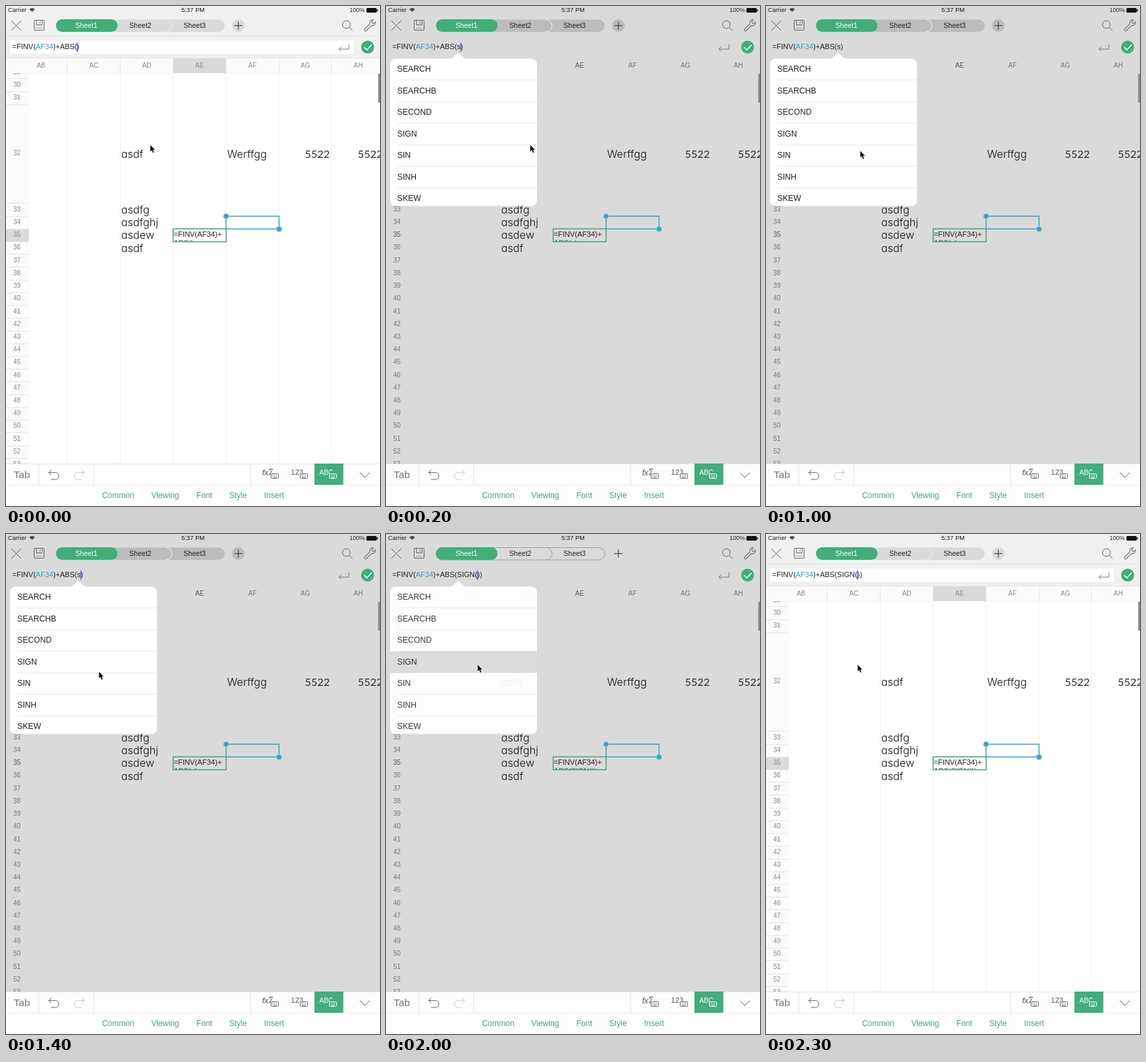
An HTML page with a canvas that plays this animation: 565x754 px, repeating every 2.4 s.

```html
<!DOCTYPE html>
<html lang="en">
<head>
<meta charset="utf-8">
<title>Spreadsheet formula completion</title>
<style>
  html, body { margin: 0; width: 100%; height: 100%; overflow: hidden; background: #fff; }
  #stage { position: relative; width: 565px; height: 754px; overflow: hidden; }
  canvas { position: absolute; left: 0; top: 0; }
  .cell {
    position: absolute; white-space: pre; color: #151515; line-height: 20px;
    font: 300 16.2px/20px Inter, sans-serif; font-feature-settings: "cv11" 1;
  }
  .num { font-family: Lato, sans-serif; font-weight: 400; color: #2a2a2a; }
</style>
</head>
<body>
<div id="stage"><canvas id="base" width="565" height="754"></canvas></div>
<script>
const W = 565, H = 754, LOOP = 2400, STEP = 100;
const stage = document.getElementById('stage');
const base = document.getElementById('base').getContext('2d');

const GREEN = '#43ad7b', BLUE = '#3c9fbd';
const COLS = [92, 172, 252, 332, 412, 491];
const ITEMS = ['SEARCH', 'SEARCHB', 'SECOND', 'SIGN', 'SIN', 'SINH', 'SKEW'];
const PITCH = 19.22;

const LOOKS = {
  open: { bar: '#f0f0f0', field: '#fff', head: '#fbfbfb', sheet: '#fff', sel: '#dadada',
          line: '#f1f1f1', rule: '#e4e4e4', pill: '#dadada', label: '#8a8a8a' },
  fade: { bar: '#dedede', field: '#f6f6f6', head: '#ededed', sheet: '#f2f2f2', sel: '#d8d8d8',
          line: '#e8e8e8', rule: '#e0e0e0', pill: null, label: '#858585', rows: true },
  dim:  { bar: '#dadada', field: null, head: null, sheet: '#dadada', sel: null,
          line: null, rule: null, pill: '#bcbcbc', label: '#777' }
};

// cell texts sit between the two canvases
function addCell(text, x, y, num) {
  const s = document.createElement('span');
  s.className = num ? 'cell num' : 'cell';
  s.textContent = text;
  s.style.left = x + 'px';
  s.style.top = (y - 9.5) + 'px';
  stage.appendChild(s);
}
addCell('asdf', 174, 222);
addCell('Werffgg', 334, 222);
addCell('5522', 451.5, 222, true);
addCell('5522', 531.5, 222, true);
['asdfg', 'asdfghj', 'asdew', 'asdf'].forEach((t, i) => addCell(t, 174, 306.5 + i * PITCH));

const topCanvas = document.createElement('canvas');
topCanvas.width = W;
topCanvas.height = H;
stage.appendChild(topCanvas);
const over = topCanvas.getContext('2d');

function box(c, x, y, w, h, fill) {
  if (!fill) return;
  c.fillStyle = fill;
  c.fillRect(x, y, w, h);
}
function pill(c, x, y, w, h, r, fill, stroke) {
  c.beginPath();
  c.roundRect(x, y, w, h, r);
  if (fill) { c.fillStyle = fill; c.fill(); }
  if (stroke) { c.strokeStyle = stroke; c.lineWidth = 1; c.stroke(); }
}
function line(c, pts, color, width = 1) {
  if (!color) return;
  c.beginPath();
  for (let i = 0; i < pts.length; i += 2) c.lineTo(pts[i], pts[i + 1]);
  c.strokeStyle = color;
  c.lineWidth = width;
  c.stroke();
}
function disc(c, x, y, r, fill, stroke, width = 1) {
  c.beginPath();
  c.arc(x, y, r, 0, Math.PI * 2);
  if (fill) { c.fillStyle = fill; c.fill(); }
  if (stroke) { c.strokeStyle = stroke; c.lineWidth = width; c.stroke(); }
}
function text(c, s, x, y, size, color, align = 'left', weight = '') {
  c.font = `${weight} ${size}px "Liberation Sans", Arial, sans-serif`;
  c.textAlign = align;
  c.textBaseline = 'middle';
  c.fillStyle = color;
  c.fillText(s, x, y);
  return x + c.measureText(s).width;
}

function drawStatus(c) {
  text(c, 'Carrier', 3, 6.5, 9.2, '#222');
  for (const r of [1, 3, 5]) {
    c.beginPath();
    c.arc(39.5, 9, r, -Math.PI * .77, -Math.PI * .23);
    c.strokeStyle = '#222';
    c.lineWidth = 1.3;
    c.stroke();
  }
  text(c, '5:37 PM', 282.5, 6.5, 9.4, '#111', 'center');
  text(c, '100%', 519, 6.5, 9, '#222');
  pill(c, 544.5, 3, 15.5, 7, 1.5, '#111');
  box(c, 560.5, 5, 1.5, 3, '#111');
}

function drawTabs(c, k, outline) {
  const ink = '#666';
  line(c, [8, 22, 23, 37], ink);
  line(c, [23, 22, 8, 37], ink);

  pill(c, 42.5, 21.5, 15, 15, 1.5, null, ink);
  line(c, [46, 22, 46, 28.5, 54.5, 28.5, 54.5, 22], ink);
  line(c, [51.5, 23.5, 51.5, 26.5], ink);
  line(c, [45, 33.5, 55, 33.5], '#999');

  const fill = outline ? null : k.pill;
  pill(c, 75.5, 20.5, 255, 18.5, 9.25, fill, outline ? '#a2a2a2' : null);
  if (k.pill) {
    c.beginPath();
    c.arc(241.5, 29.75, 9.3, -Math.PI / 2, Math.PI / 2);
    c.strokeStyle = outline ? '#a2a2a2' : '#f0f0f0';
    c.lineWidth = 1;
    c.stroke();
  }
  pill(c, 75.5, 20, 93, 19, 9.5, GREEN);
  text(c, 'Sheet1', 121.5, 30, 10.5, '#fff', 'center');
  text(c, 'Sheet2', 203, 30, 10.5, '#222', 'center');
  text(c, 'Sheet3', 285, 30, 10.5, '#222', 'center');

  if (fill) disc(c, 351, 29.5, 9.7, fill);
  line(c, [345, 29.5, 357, 29.5], '#444', 1.2);
  line(c, [351, 23.5, 351, 35.5], '#444', 1.2);

  disc(c, 514.2, 28, 5.8, null, ink);
  line(c, [518.5, 32.3, 523.5, 37.3], ink);

  // wrench
  c.save();
  c.translate(549.5, 29.5);
  c.rotate(Math.PI / 4);
  c.beginPath();
  c.moveTo(-1.8, -2);
  c.lineTo(-1.8, 9);
  c.arc(0, 9, 1.8, Math.PI, 0, true);
  c.lineTo(1.8, -2);
  c.bezierCurveTo(5.5, -4, 5, -8.5, 2, -10);
  c.lineTo(2, -5.8);
  c.lineTo(-2, -5.8);
  c.lineTo(-2, -10);
  c.bezierCurveTo(-5, -8.5, -5.5, -4, -1.8, -2);
  c.strokeStyle = ink;
  c.lineWidth = 1;
  c.stroke();
  c.restore();
}

function drawFormula(c, k, arg, caret) {
  if (k.field) pill(c, 6, 52, 520, 20, 2.5, k.field);
  const size = 11.07, y = 62, ink = '#222';
  let x = text(c, '=FINV(', 9.5, y, size, ink);
  x = text(c, 'AF34', x, y, size, '#3c9bc0');
  x = text(c, ')+ABS(', x, y, size, ink);
  const inner = arg.endsWith(')') ? arg.slice(0, -1) : arg;
  x = text(c, inner, x, y, size, ink);
  text(c, arg.slice(inner.length) + ')', x, y, size, ink);
  if (caret) box(c, x - .4, 55, 1.5, 14, '#4472d6');

  line(c, [518, 58, 518, 65, 503, 65], '#777');
  line(c, [506.5, 61.5, 503, 65, 506.5, 68.5], '#777');
  disc(c, 546.3, 62, 9.8, GREEN);
  line(c, [541, 62, 545.2, 66.2, 552.3, 58.5], '#fff', 1.4);
}

function drawGrid(c, k, arg) {
  box(c, 0, 78, W, 612, k.sheet);
  box(c, 0, 78, W, 23.5, k.head);
  box(c, 0, 101, 34.5, 589, k.head);
  box(c, 252, 78.5, 80.5, 23, k.sel);
  box(c, 0, 336, 34.5, 19.2, k.sel);
  for (const x of COLS) {
    line(c, [x + .5, 79, x + .5, 101], k.rule);
    line(c, [x + .5, 102, x + .5, 690], k.line);
  }
  line(c, [0, 78.5, W, 78.5], k.rule);
  line(c, [0, 45.5, W, 45.5], k.rule);
  line(c, [0, 101.5, W, 101.5], k.line);

  ['AB', 'AC', 'AD', 'AE', 'AF', 'AG', 'AH'].forEach((s, i) =>
    text(c, s, 52.8 + i * 79.9, 89.8, 10, s === 'AE' && !k.sel ? '#555' : k.label, 'center'));

  c.save();
  c.beginPath();
  c.rect(0, 101.5, W, 588.5);
  c.clip();
  for (let r = 29; r <= 53; r++) {
    const y = r < 32 ? 119 + (r - 30) * PITCH : r === 32 ? 222.5 : 307 + (r - 33) * PITCH;
    const end = Math.round(r === 32 ? 297 : y + PITCH / 2) + .5;
    text(c, String(r), 16.5, y, 10, r === 35 && !k.sel ? '#555' : k.label, 'center');
    line(c, [0, end, k.rows ? W : 34, end], k.rows ? k.line : k.rule);
  }
  c.restore();

  // edited cell
  c.save();
  c.beginPath();
  c.rect(252, 336, 80.5, 19.5);
  c.clip();
  box(c, 252, 336, 81, 20, k.sheet);
  text(c, '=FINV(AF34)+', 253.3, 344.6, 11.2, '#222');
  text(c, 'ABS(' + arg + ')', 253.3, 357.8, 11.2, '#555');
  c.restore();
  c.strokeStyle = '#46a274';
  c.lineWidth = 1.5;
  c.strokeRect(252.5, 336, 80, 19.5);

  // referenced cell
  c.strokeStyle = BLUE;
  c.strokeRect(332.5, 317, 80, 19.2);
  disc(c, 332.5, 317, 4, BLUE, '#9bd0df', 1);
  disc(c, 412.5, 336.4, 4, BLUE, '#9bd0df', 1);

  pill(c, 562.3, 102, 4, 44, 1.5, '#8c8c8c');
}

function undo(c, x, dir, color) {
  c.save();
  c.translate(x, 707);
  c.scale(dir, 1);
  line(c, [-3.5, -7.5, -7.5, -3.5, -3.5, .5], color);
  c.beginPath();
  c.moveTo(-7.5, -3.5);
  c.lineTo(2.5, -3.5);
  c.bezierCurveTo(9.5, -3.5, 9.5, 7, 2.5, 7);
  c.lineTo(-4, 7);
  c.stroke();
  c.restore();
}
function keys(c, x, y, color, back) {
  pill(c, x + .5, y + .5, 11, 7, 1, back, color);
  for (let i = 0; i < 3; i++) box(c, x + 2.5 + i * 2.7, y + 2.3, 1.4, 1.1, color);
  box(c, x + 3, y + 5, 6, 1, color);
}

function drawToolbar(c) {
  box(c, 0, 690, W, 64, '#fdfdfd');
  line(c, [0, 690.5, W, 690.5], '#e4e4e4');
  line(c, [0, 722.5, W, 722.5], '#eee');
  for (const x of [49.5, 132.5, 369.5, 509.5]) line(c, [x, 691, x, 722], '#e6e6e6');
  text(c, 'Tab', 11.5, 707.5, 15.5, '#777');
  undo(c, 72, 1, '#666');
  undo(c, 111, -1, '#c8c8c8');

  text(c, 'fx', 387, 704.5, 12, '#555', 'left', 'italic');
  text(c, 'Σ', 397, 704, 12, '#555');
  keys(c, 400, 705, '#666', '#fdfdfd');
  text(c, '123', 430.5, 704, 11.2, '#555');
  keys(c, 444, 705, '#666', '#fdfdfd');
  box(c, 466, 690, 43.5, 32, GREEN);
  text(c, 'ABC', 473.5, 704, 10.2, '#fff');
  keys(c, 488, 705, '#fff', GREEN);
  line(c, [534.5, 703.5, 542, 711, 549.5, 703.5], '#666');

  [['Common', 169.5], ['Viewing', 240.5], ['Font', 299.5], ['Style', 350.5], ['Insert', 405]]
    .forEach(([s, x]) => text(c, s, x, 738.8, 12.1, '#4fa37a', 'center'));
}

// the panel fades later than its contents
function drawPopup(c, alpha, picked) {
  c.save();
  c.globalAlpha = Math.sqrt(alpha);
  c.beginPath();
  c.moveTo(98, 80);
  c.lineTo(107, 72.2);
  c.quadraticCurveTo(109, 70.5, 111, 72.2);
  c.lineTo(120, 80);
  c.fillStyle = '#fff';
  c.fill();
  pill(c, 6, 79.5, 222, 222, 8, '#fff');
  c.clip();
  c.globalAlpha = alpha;
  if (picked) box(c, 6, 177, 222, 32.5, '#d9d9d9');
  ITEMS.forEach((s, i) => {
    const y = 96 + i * 32.5;
    text(c, s, 17, y, 12.2, '#222');
    const end = Math.floor(y + 15.5) + .5;
    if (i < 6) line(c, [17, end, 228, end], '#e9e9e9');
  });
  c.restore();
}

function drawPointer(c, x, y) {
  c.save();
  c.translate(x, y);
  c.beginPath();
  [[0, 0], [0, 10], [2.3, 8], [4, 12], [5.7, 11.3], [4, 7.4], [7, 7.4]].forEach(p => c.lineTo(...p));
  c.closePath();
  c.strokeStyle = '#fff';
  c.lineWidth = 1.4;
  c.stroke();
  c.fillStyle = '#111';
  c.fill();
  c.restore();
}

function ease(n, from, to) {
  const p = Math.min(1, Math.max(0, (n - from) / (to - from)));
  return p * p * (3 - 2 * p);
}

let shown = -1;
function render(n) {
  const k = n === 1 || n === 21 ? LOOKS.fade : n > 1 && n < 21 ? LOOKS.dim : LOOKS.open;
  const arg = n < 1 ? '' : n < 20 ? 's' : 'SIGN()';
  const caret = n < 7 || n > 11;
  const alpha = n < 1 ? 0 : n === 1 ? .6 : n < 20 ? 1 : [.9, .35, .03, 0][n - 20];

  box(base, 0, 0, W, H, k.bar);
  drawStatus(base);
  drawTabs(base, k, n === 20);
  drawFormula(base, k, arg, caret);
  drawGrid(base, k, arg);
  drawToolbar(base);

  over.clearRect(0, 0, W, H);
  if (alpha) drawPopup(over, alpha, n >= 19);
  const a = ease(n, 6, 10), b = ease(n, 11, 17);
  drawPointer(over, 218 - 75.5 * a - 4 * b, 209.5 + 9 * a - 21.5 * b);
}

const start = performance.now();
function tick() {
  const n = Math.floor(((performance.now() - start) % LOOP) / STEP);
  if (n !== shown) render(shown = n);
  requestAnimationFrame(tick);
}
tick();
</script>
</body>
</html>
```
